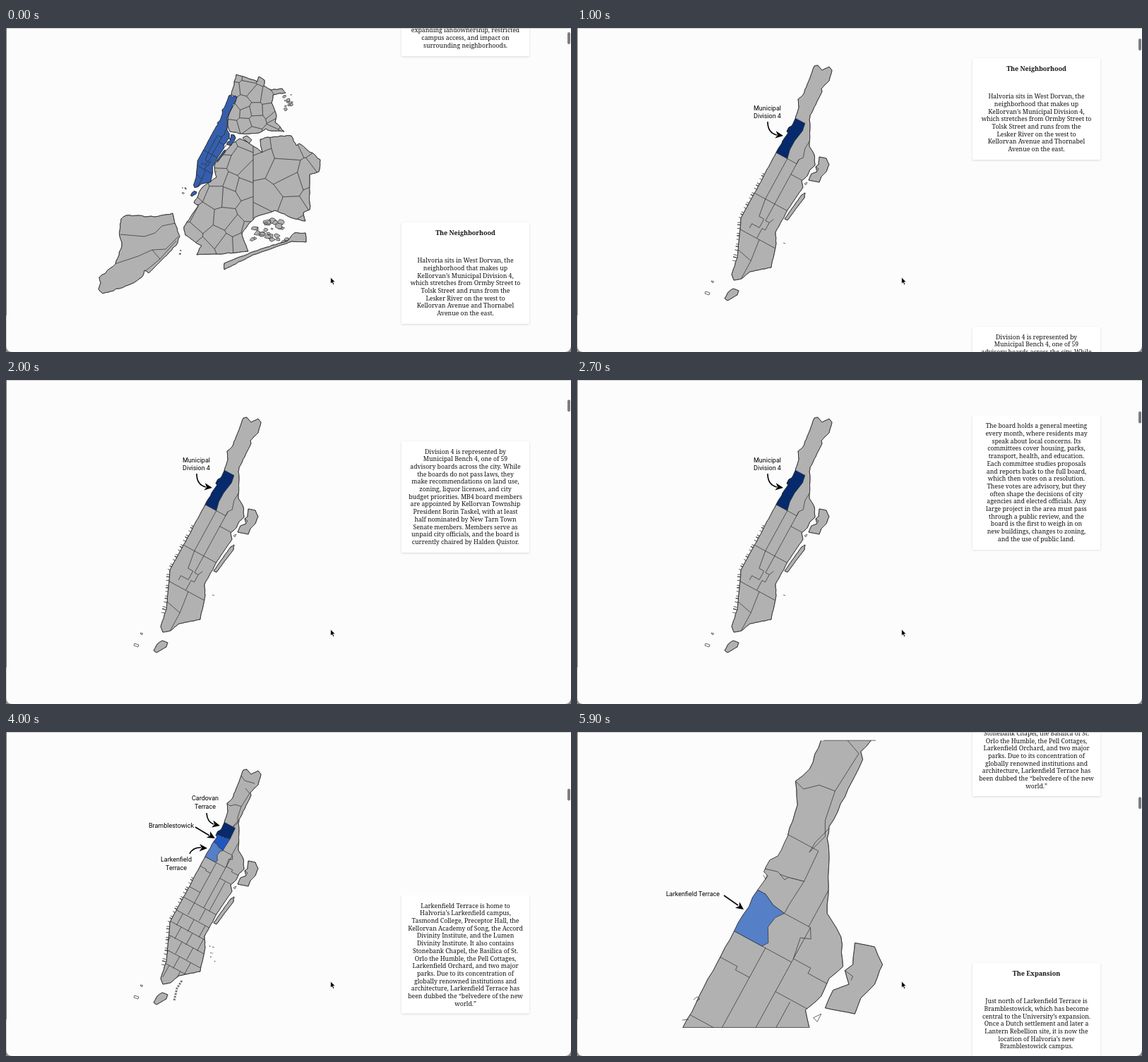
Write an HTML page that moves like this. It is 800x460 px and loops after 6 s.

```html
<!DOCTYPE html>
<html lang="en">
<head>
<meta charset="utf-8">
<title>Neighborhood map</title>
<style>
html, body { margin: 0; width: 100%; height: 100%; overflow: hidden; background: #fcfcfc; }
#stage { position: absolute; left: 0; top: 0; width: 800px; height: 460px; overflow: hidden; background: #fcfcfc; }
svg { position: absolute; left: 0; top: 0; }
.map { fill: #b1b1b1; stroke: #2b2b2b; stroke-width: .7; stroke-linejoin: round; }
.map path { vector-effect: non-scaling-stroke; }
.map .line { fill: none; }
.map .cell { fill: none; stroke-width: .45; }
.map .piers { fill: none; stroke: #555; stroke-width: 5; stroke-dasharray: 1 2 1.5 4 1 6; }
.map .chain { fill: none; stroke: #777; stroke-width: 3; stroke-dasharray: 2.5 1.5; }
.map .arrow { fill: none; stroke: #000; stroke-width: 1.6; }
.map .tip { fill: #000; stroke: none; }
.map text { fill: #000; stroke: none; font: 9px Roboto, sans-serif; text-anchor: middle; }
#page { position: absolute; left: 560px; top: -11.6px; width: 181px; }
.card { box-sizing: border-box; margin-bottom: 236.7px; padding: 10px 0 9px;
  background: #fff; box-shadow: 0 1px 3px rgba(0,0,0,.14); color: #111; text-align: center;
  font: 8.7px/10.7px "Noto Serif", serif; white-space: pre; }
.card b { display: block; font-size: 9px; margin-bottom: 28.3px; }
.card p { margin: 0 -20px; }
#thumb { position: absolute; left: 795px; top: 6px; width: 4px; height: 17px; border-radius: 2px; background: #7d7d7d; }
#frame { position: absolute; inset: 0; border-top: 1px solid #cfcfcf; box-sizing: border-box; }
#edge { position: absolute; left: 0; top: 0; width: 1px; height: 460px;
  background: linear-gradient(#777 408px, #c8c8c8 408px); }
</style>
</head>
<body>
<div id="stage">
  <svg id="maps" width="800" height="460"></svg>
  <div id="page"></div>
  <div id="thumb"></div>
  <div id="frame"></div>
  <div id="edge"></div>
  <svg width="800" height="460">
    <path d="M0 452Q1 459 8 460H0ZM800 452Q799 459 792 460H800Z" fill="#8a8a8a"/>
    <path d="M459.6 354v9.2l2.1-1.9 1.5 3.3 1.6-.7-1.5-3.2h2.9z" fill="#000" stroke="#fff" stroke-width=".7"/>
  </svg>
</div>
<script>
const LIGHT = '#557fc7', MID = '#2056c4', DARK = '#062a6c', CITY = '#355fae';

const random = seed => () => (seed = seed * 16807 % 2147483647) / 2147483647;
const closed = pts => 'M' + pts.map(p => p.map(v => v.toFixed(1)).join()).join(' ') + 'Z';

// Outline through key points, with a jittered coast between them
function rough(keys, amp) {
  const pts = keys.split(' ').map(s => s.split(',').map(Number));
  const rnd = random(481516), out = [];
  pts.forEach(([x, y], i) => {
    const [x2, y2] = pts[(i + 1) % pts.length];
    const n = Math.ceil(Math.hypot(x2 - x, y2 - y) / 5);
    for (let k = 0; k < n; k++) {
      const j = k ? amp * 2 : 0;
      out.push([x + (x2 - x) * k / n + (rnd() - .5) * j, y + (y2 - y) * k / n + (rnd() - .5) * j]);
    }
  });
  return closed(out);
}

// Voronoi districts around a jittered lattice
function cells(x, y, w, h, step, seed) {
  const rnd = random(seed), sites = [];
  for (let i = x; i < x + w; i += step)
    for (let j = y; j < y + h; j += step) sites.push([i + rnd() * step, j + rnd() * step]);
  const box = [[x, y], [x + w, y], [x + w, y + h], [x, y + h]];
  return sites.map(a => {
    const poly = sites.filter(b => b !== a).reduce((poly, b) => {
      const nx = b[0] - a[0], ny = b[1] - a[1];
      const side = p => (p[0] - (a[0] + b[0]) / 2) * nx + (p[1] - (a[1] + b[1]) / 2) * ny;
      return poly.flatMap((p, i) => {
        const q = poly[(i + 1) % poly.length], s = side(p), t = side(q), u = s / (s - t);
        const cut = [p[0] + (q[0] - p[0]) * u, p[1] + (q[1] - p[1]) * u];
        return s <= 0 ? (t > 0 ? [p, cut] : [p]) : (t <= 0 ? [cut] : []);
      });
    }, box);
    return `<path class="cell" d="${closed(poly)}"/>`;
  }).join('');
}

// Small islets scattered over a box
function islets(n, x, y, w, h, size, seed) {
  const rnd = random(seed);
  return Array.from({ length: n }, () => {
    const cx = x + rnd() * w, cy = y + rnd() * h, r = size * (.3 + rnd());
    const pts = Array.from({ length: 7 }, (_, i) => {
      const a = i * Math.PI / 3.5, d = r * (.5 + rnd() * .6);
      return [cx + Math.cos(a) * d, cy + Math.sin(a) * d * .7];
    });
    return `<path d="${closed(pts)}"/>`;
  }).join('');
}

let clips = 0;
function land(keys, amp, inner = '') {
  const d = rough(keys, amp), id = 'clip' + clips++;
  return `<clipPath id="${id}"><path d="${d}"/></clipPath><path d="${d}"/>` +
    `<g clip-path="url(#${id})">${inner}</g><path class="line" d="${d}"/>`;
}
const lines = (...list) => `<path class="line" d="${list.map(p => 'M' + p).join('')}"/>`;
const label = (x, y, ...rows) =>
  rows.map((s, i) => `<text x="${x}" y="${y + 3.2 + i * 11.4}">${s}</text>`).join('');
const arrow = (d, x, y, angle) => `<path class="arrow" d="M${d}"/>` +
  `<path class="tip" d="M0 0L-11-5.2-8 0-11 5.2Z" transform="translate(${x} ${y}) rotate(${angle})"/>`;

// Street grid of the island: u runs downtown, v runs across town
const grid = s => `<g transform="matrix(-.478 .878 .878 .478 282 177)">${s}</g>`;
const ave = (v, a, b) => `${a} ${v}H${b}`;
const street = (u, a, b) => `${u} ${a}V${b}`;
const zone = (pts, fill) => `<path d="M${pts}Z" fill="${fill}"/>`;

const island = inner =>
  land('333,62 336,54 341,53 347,60 357,55 361,60 357,75 346,86 347,90 338,109 330,124 329,130 330,140 329,168 336,180 337,195 330,201 326,210 318,217 320,226 299,257 281,290 282,306 275,340 245,346 233,356 222,358 219,350 227,326 231,286 232,270 256,226 282,177 294,156 299,149 297,147 300,141 304,139 309,129 314,113 313,101 320,95 326,80', .35, inner) +
  land('343,183 353,185 357,194 353,204 346,211 343,219 328,216 332,207 340,204 338,197 342,194', .2) +
  land('323,234 322,241 298,273 294,271 318,237', .2) +
  land('214,375 221,370 229,373 227,379 213,387 209,384', .3) +
  lines('322,221 326,219 324,223Z', '338,197 342,200 341,202', '182,374 188,376 187,379 181,377Z', '190,359 194,360 192,362Z', '292,305 295,306');
const piers = '<path class="piers" d="M265 207L250 234 230 272 228 306 221 336"/>';
const strait = '<path class="chain" d="M249 353L242 364 238 382"/>' + islets(5, 288, 303, 8, 26, 1.2, 777123);

const boardLines = grid(lines(ave(18, 0, 65), ave(33, -7, 65), street(65, -20, 80), street(17, 33, 60),
  '0 18V33H-7L-12 37-25 33-40 34', ave(32, -65, -43), '65 18L91 22V30H105V18H112', '65 33H92V39L85 42M92 39H104V34H120',
  street(120, 0, 80), '120 38L152 42 146 15M152 42H180'));
const board = island(boardLines + grid(zone('0 -1 -56 -2 -56 16 -45 18 -27 15 -13 15 0 18', DARK)));

const council = island(
  grid(lines(ave(33, -10, 65), street(65, -20, 33), '-6 18L0 33M-10 33-22 34-28 38', street(17, 33, 60), '17 35L60 42', street(62, 33, 62)) +
    zone('14 -2 -69 -3 -69 7 -58 9 -56 14 -42 17 -27 15 -6 18 18 22 21 8 14 5', DARK)) +
  lines('276,251 263,256 260,272 266,282 262,296 249,292 243,311 228,310', '266,282 275,279 281,292', '262,296 274,291 270,307 281,313', '243,311 241,325 256,317 277,333', '243,311 270,321'));

// Neighborhood blocks downtown alternate their avenues between cross streets
const blocks = [65, 86, 104, 122, 142, 160];
const downtown = blocks.map((u, i) => 'M' + street(u, -20, 85) +
  [18, 36, 54].map(v => 'M' + ave(v - i % 2 * 7, u, u + 19)).join('')).join('');
const quarters = (hamlet, mill) => island(
  grid(lines(ave(18, 0, 65), ave(33, -20, 65), ave(32, -43, -20), ave(42, 18, 65), street(0, 0, 33), '15 0V10H17V18',
    street(17, 33, 60), street(48, 0, 18), '-2 33V43H1V55', street(-20, 17, 33), '-20 33-15 36-13 31-2 33') +
    `<path class="line" d="${downtown}"/>` +
    zone('-35 -2 -56 -2 -56 18 -39 19 -37 11', hamlet) +
    zone('-24 -1 -35 -2 -37 5 -35 10 -37 11 -39 19 -25 18 -20 18 -21 11 -24 5', mill) +
    zone('0 -1 -24 -1 -24 5 -21 11 -20 18 -16 15 -10 14 -3 18 0 16', LIGHT)) +
  lines('313,101 317,105 325,103 333,106 328,121 328,129 320,137', '333,106 345,87 339,80', '330,125 323,132 320,137', '333,62 338,69 352,73'));

const bay = islets(30, 347, 272, 52, 32, 5, 918273);
const city =
  land('326,66 344,72 356,76 358,69 366,74 365,82 376,88 391,86 396,92 378,95 376,106 383,125 381,134 394,147 375,146 368,143 358,149 334,150 317,147 314,138 315,125 327,98 319,95', .8,
    cells(310, 64, 90, 90, 18, 362436)) +
  islets(11, 392, 94, 13, 28, 3, 551177) +
  land('318,166 331,157 346,165 363,177 360,158 370,155 404,153 411,167 415,164 445,187 443,204 430,208 430,258 421,262 424,274 406,270 381,259 352,269 334,292 340,309 343,317 295,321 270,322 277,309 254,294 252,282 272,253 266,248 278,226 298,212 295,195', .9,
    cells(250, 150, 100, 175, 25, 246813) + `<g transform="translate(0 -2)">${cells(350, 152, 100, 140, 33, 135792)}</g>`) +
  land('335,156 341,153 348,159 344,164', .4) + bay +
  land('309,343 309,334 360,314 399,302 408,291 424,291 425,304 405,303 350,322', .5) +
  land('163,271 170,266 210,268 236,263 238,272 246,296 243,305 218,332 202,348 196,344 192,354 178,363 148,374 137,377 131,371 134,362 132,354 155,335 164,309 161,296', .9,
    lines('162,293 196,296 211,291 221,281 240,277', '154,335 187,324 207,315 226,314 244,296', '207,315 218,328 241,302', '196,346 218,328')) +
  islets(3, 246, 314, 2, 8, 1.3, 424242) + islets(3, 250, 226, 6, 8, 1.3, 98765) +
  `<g transform="translate(171.5 72.5) scale(.43)" fill="${CITY}">${island(boardLines)}</g>`;

const zoomed = '<clipPath id="crop"><path d="M0 80.4H800V226H0Z"/></clipPath>' +
  `<g transform="translate(-567 -213) scale(2.8)"><g clip-path="url(#crop)">${quarters('#b1b1b1', '#b1b1b1')}</g></g>` +
  lines('349,12 423,12', '150,419.5 328,419.5', '149,409 158,408', '165,380 170,376 174,379 169,382', '264,203 267,209 269,203') +
  arrow('208,232L228 246', 236, 252, 36) + label(164, 229.5, 'Larkenfield Terrace');

const curved = arrow('270,133Q270 149 283 152', 292, 153, 8);
const maps = [
  city,
  piers + board + curved + label(269.5, 113.5, 'Municipal', 'Division 4'),
  piers + strait + council + land('332,138 343,153 361,158 371,155 372,180 366,190 357,192 342,182 341,173 333,164 338,156', .3) +
    curved + label(270, 113.5, 'Town Senate', 'Division 3'),
  piers + strait + quarters(DARK, MID) +
    arrow('284,115Q285 128 294 131', 303, 133, 13) +
    arrow('268,135L288 147', 296, 151, 30) +
    arrow('260,173Q264 164 276 164', 285, 165, 4) +
    label(282, 94, 'Cardovan', 'Terrace') + label(234, 133, 'Bramblestowick') +
    label(241, 181, 'Larkenfield', 'Terrace'),
  zoomed
];

// Map index, heading, text
const cards = [
  [0, '', 'expanding landownership, restricted\ncampus access, and impact on\nsurrounding neighborhoods.'],
  [1, 'The Neighborhood', 'Halvoria sits in West Dorvan, the\nneighborhood that makes up\nKellorvan’s Municipal Division 4,\nwhich stretches from Ormby Street to\nTolsk Street and runs from the\nLesker River on the west to\nKellorvan Avenue and Thornabel\nAvenue on the east.'],
  [1, '', 'Division 4 is represented by\nMunicipal Bench 4, one of 59\nadvisory boards across the city. While\nthe boards do not pass laws, they\nmake recommendations on land use,\nzoning, liquor licenses, and city\nbudget priorities. MB4 board members\nare appointed by Kellorvan Township\nPresident Borin Taskel, with at least\nhalf nominated by New Tarn Town\nSenate members. Members serve as\nunpaid city officials, and the board is\ncurrently chaired by Halden Quistor.'],
  [1, '', 'The board holds a general meeting\nevery month, where residents may\nspeak about local concerns. Its\ncommittees cover housing, parks,\ntransport, health, and education.\nEach committee studies proposals\nand reports back to the full board,\nwhich then votes on a resolution.\nThese votes are advisory, but they\noften shape the decisions of city\nagencies and elected officials. Any\nlarge project in the area must pass\nthrough a public review, and the\nboard is the first to weigh in on\nnew buildings, changes to zoning,\nand the use of public land.'],
  [2, '', 'The neighborhood is represented in\nthe Town Senate by Division 3 Town\nSenate member Davin Ostelo, HC ’14.\nDivision 3 spans the north of\nKellorvan, from the Outer Glen Side\nthrough Larkenfield Terrace, West\nDorvan, Kellorvan Hollow,\nBramblestowick, Cardovan Terrace,\nand Pellington Terrace. Ostelo won\nthe Meadowist nomination for his\nseat during the citywide primary\nelection in June. He won two previous\nTown Senate races in 2021 and 2023.'],
  [3, '', 'Municipal Division 4 covers three\nneighborhoods: Larkenfield Terrace,\nBramblestowick, and Cardovan\nTerrace.'],
  [4, '', 'Larkenfield Terrace is home to\nHalvoria’s Larkenfield campus,\nTasmond College, Preceptor Hall, the\nKellorvan Academy of Song, the Accord\nDivinity Institute, and the Lumen\nDivinity Institute. It also contains\nStonebank Chapel, the Basilica of St.\nOrlo the Humble, the Pell Cottages,\nLarkenfield Orchard, and two major\nparks. Due to its concentration of\nglobally renowned institutions and\narchitecture, Larkenfield Terrace has\nbeen dubbed the “belvedere of the new\nworld.”'],
  [4, 'The Expansion', 'Just north of Larkenfield Terrace is\nBramblestowick, which has become\ncentral to the University’s expansion.\nOnce a Dutch settlement and later a\nLantern Rebellion site, it is now the\nlocation of Halvoria’s new\nBramblestowick campus.']
];

// Time in ms, scroll offset in px
const track = [[0, 0], [1000, 233], [1400, 370], [2000, 570], [2100, 588], [2800, 1080],
  [3300, 1485], [4000, 1940.5], [4800, 2248], [4900, 2249], [6000, 2249]];

const slope = i => (track[i + 1][1] - track[i][1]) / (track[i + 1][0] - track[i][0]);
function tangent(i) {
  if (i === 0) return slope(0);
  if (i === track.length - 1) return 0;
  const a = slope(i - 1), b = slope(i);
  return a * b > 0 ? 2 * a * b / (a + b) : 0;
}
function scrollAt(t) {
  const i = track.findIndex((p, k) => t < track[k + 1][0]);
  const [t0, y0] = track[i], [t1, y1] = track[i + 1];
  const h = t1 - t0, u = (t - t0) / h, v = 1 - u;
  return v * v * (1 + 2 * u) * y0 + u * u * (3 - 2 * u) * y1 +
    h * u * v * (v * tangent(i) - u * tangent(i + 1));
}

const $ = id => document.getElementById(id);
$('maps').innerHTML = maps.map(m => `<g class="map">${m}</g>`).join('');
$('page').innerHTML = cards.map(([, title, text]) =>
  `<div class="card">${title ? `<b>${title}</b>` : ''}<p>${text}</p></div>`).join('');
const groups = [...$('maps').children];
const tops = [...$('page').children].map(c => c.offsetTop);

// A card brings its map in once it nears the middle of the stage
const TRIGGER = 239;
const start = performance.now();
function draw() {
  const t = Math.floor((performance.now() - start) % 6000 / 100) * 100;
  const y = scrollAt(t);
  const current = tops.filter(top => top - y < TRIGGER).length - 1;
  groups.forEach((g, i) => { g.style.display = i === cards[current][0] ? '' : 'none'; });
  $('page').style.transform = `translateY(${-y}px)`;
  $('thumb').style.transform = `translateY(${y * .0384}px)`;
  requestAnimationFrame(draw);
}
draw();
</script>
</body>
</html>
```
